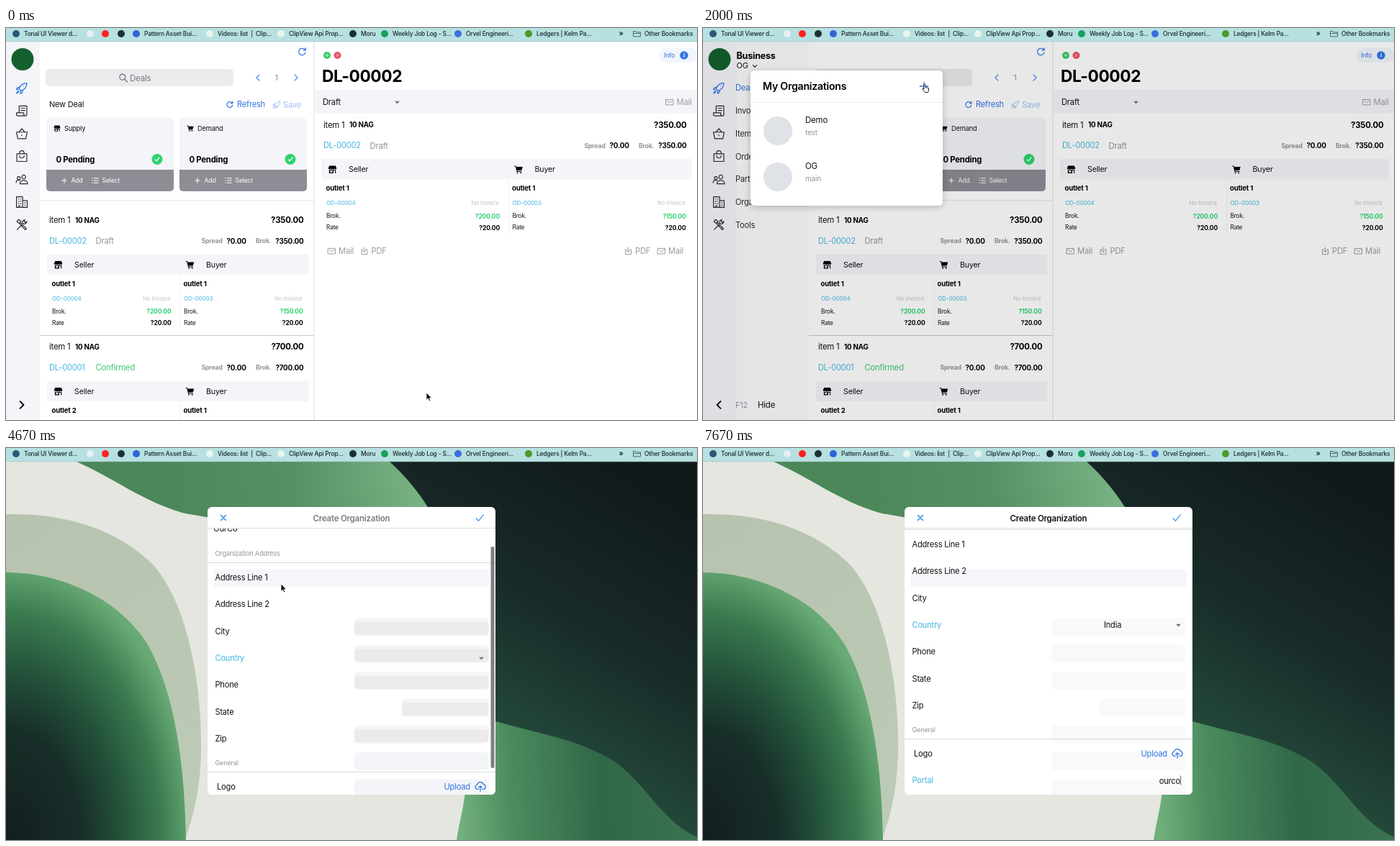
These frames come from a looping animation (960x545 px, 8000 ms). An HTML page:

```html
<!DOCTYPE html>
<html lang="en">
<head>
<meta charset="utf-8">
<title>Create organization</title>
<style>
  html, body { margin: 0; width: 100%; height: 100%; overflow: hidden; background: #fff; }
  svg { display: block; width: 960px; height: 545px; }
  text { font-family: Inter, "Open Sans", sans-serif; letter-spacing: -.02em; white-space: pre; }
</style>
</head>
<body>
<script>
const LOOP = 8000;
const BLUE = '#2f72e4', SKY = '#45b5e0', GREEN = '#2dd36f', GRAY = '#92949c', PALE = '#f4f5f8';
const rules = [];

// Stepped animation of one property: stops are [ms, value]
function anim(prop, stops) {
  const name = 'a' + rules.length;
  const steps = stops.map(([t, v]) => `${t / LOOP * 100}%{${prop}:${v}}`).join('');
  rules.push(`@keyframes ${name}{${steps}}`);
  return `style="animation:${name} ${LOOP}ms step-end infinite"`;
}
const group = (attrs, ...parts) => `<g ${attrs}>${parts.join('')}</g>`;
const show = (from, to, ...parts) => {
  const stops = from ? [[0, 0], [from, 1]] : [[0, 1]];
  if (to < LOOP) stops.push([to, 0]);
  return group(anim('opacity', stops), ...parts);
};
const move = (stops, ...parts) =>
  group(anim('transform', stops.map(([t, x, y]) => [t, `translate(${x}px,${y}px)`])), ...parts);

// y is the middle of the capitals
const text = (x, y, str, size, fill = '#111', weight = 400, anchor = 'start') =>
  `<text x="${x}" y="${y + size * .36}" font-size="${size}" fill="${fill}" font-weight="${weight}" text-anchor="${anchor}">${str}</text>`;
const bold = (x, y, str, size, fill = '#000') => text(x, y, str, size, fill, 700);
const right = (x, y, str, size, fill = '#000', weight = 700) => text(x, y, str, size, fill, weight, 'end');
const rect = (x, y, w, h, fill, r = 0) => `<rect x="${x}" y="${y}" width="${w}" height="${h}" rx="${r}" fill="${fill}"/>`;
const dot = (x, y, r, fill) => `<circle cx="${x}" cy="${y}" r="${r}" fill="${fill}"/>`;
const line = (d, color, w = 1) =>
  `<path d="${d}" fill="none" stroke="${color}" stroke-width="${w}" stroke-linecap="round" stroke-linejoin="round"/>`;

// Outline icons in a 16 x 16 box
const ICONS = {
  rocket: 'M4.5 9C6 4 10 1.5 14.5 1.5 14.5 6 12 10 7 11.5zM5.5 6.5L2 7.5.8 10l3.7-1M9.5 10.5L8.5 14 6 15.2l1-3.7M3.5 11.5L1 15l3.5-2.5M10.5 5.5v.1',
  receipt: 'M4.5 10.5v-9h10v11a2 2 0 0 1-4 0v-2H1v2a2 2 0 0 0 2 2h9.5M7 4.5h5M7 7.5h5',
  basket: 'M1 6h14l-1.7 8.5H2.7zM4 6l4-4.5L12 6M8 9.5v1',
  bag: 'M1.5 4.5h13v10h-13zM5 4.5v-1a3 3 0 0 1 6 0v1M5 7a3 3 0 0 0 6 0',
  people: 'M10.5 2.5a2.5 2.5 0 1 0 .01 0M5.5 14c0-6 10-6 10 0zM4 4.5a2 2 0 1 0 .01 0M.5 12.5c0-3 2.5-4 5-3',
  building: 'M1 15V1h8v14zM9 6h6v9H9M3.5 4h.5M6 4h.5M3.5 7H4M6 7h.5M3.5 10H4M6 10h.5M11.5 9h1M11.5 12h1M4 15v-2h2',
  tools: 'M2 14L9.5 6.5M14.5 3.5a3.5 3.5 0 0 1-5 3M12 1.2a3.5 3.5 0 0 0-3 4.5M14.5 3.5L12.5 5l-1.5-1.5 1-2.3M1.5 3.5L4 1l3 2.5L4.5 6zM6 5l8 8-1.5 1.5-7.5-8',
  refresh: 'M13.5 9A5.8 5.8 0 1 1 11.5 3.5L13.5 5M13.7 1.5V5.3H10',
  search: 'M6.5 1.5a5 5 0 1 0 .01 0M10.2 10.2l4.6 4.6',
  mail: 'M1 3h14v10.5H1zM3 5.5l5 4 5-4',
  pdf: 'M5 5H2.5v9.5h11V5H11M8 1v9M5.2 7.5L8 10.2l2.8-2.7',
  list: 'M5.5 3h9M5.5 8h9M5.5 13h9M1.5 3h.8M1.5 8h.8M1.5 13h.8',
  plus: 'M8 1.5v13M1.5 8h13',
  cloud: 'M5.5 12H4a3.3 3.3 0 0 1-.3-6.5 4.6 4.6 0 0 1 8.8-.3A3.5 3.5 0 0 1 12.3 12h-1.8M8 15V7.5M5.7 9.5L8 7.2l2.3 2.3',
  right: 'M5 2l6 6-6 6', left: 'M11 2L5 8l6 6', down: 'M2 5l6 6 6-6',
  cross: 'M2 2l12 12M14 2L2 14', tick: 'M1.5 9l4.5 4.5 9-11'
};
const icon = (name, x, y, size, color, w = 1.2) =>
  group(`transform="translate(${x - size / 2} ${y - size / 2}) scale(${size / 16})"`,
    line(ICONS[name], color, w * 16 / size));
const solid = (d, x, y, size) =>
  `<path transform="translate(${x - size / 2} ${y - size / 2}) scale(${size / 16})" fill-rule="evenodd" d="${d}"/>`;
const store = (x, y, s) => solid('M2 1h12l2 5a2.2 2.2 0 0 1-4 1 2.3 2.3 0 0 1-4 0 2.3 2.3 0 0 1-4 0A2.2 2.2 0 0 1 0 6zM1.5 9h13v6.5h-13zM3.5 10.5V14H8v-3.5zM10 10.5v5h3v-5z', x, y, s);
const cart = (x, y, s) => solid('M0 1h3l.7 2H16l-2 7H5.6l.4 1.5h8V13H4.7L2 2.5H0zM6 13.5a1.2 1.2 0 1 0 .01 0M12.5 13.5a1.2 1.2 0 1 0 .01 0', x, y, s);
const caret = (x, y) => `<path d="M${x - 3.5} ${y - 1.7}h7l-3.5 3.7z" fill="#777"/>`;

function bookmarks() {
  const tabs = [
    [14, '#2b5876', 'Tonal UI Viewer d...'], [117, '#e9eef5'], [138, '#f22'], [160, '#1c3034'],
    [181, '#2f63d8', 'Pattern Asset Bui...'], [283, '#e8f4ee', 'Videos: list  |  Clip...'],
    [382, '#e8f4ee', 'ClipView Api Prop...'], [482, '#1c3034', 'Moru'],
    [526, '#18a05a', 'Weekly Job Log - S...'], [628, '#3a6fe0', 'Orvel Engineeri...'],
    [726, '#4a9a28', 'Ledgers | Kelm Pa...']
  ];
  return rect(0, 0, 960, 19, '#b7e0e0') + rect(0, 18.5, 960, .7, '#a3c9c9') +
    tabs.map(([x, c, s]) => dot(x, 8, 5, c) + (s ? text(x + 11, 8, s, 8.4, '#17292b', 500) : '')).join('') +
    text(851.5, 7.5, '»', 10, '#17292b', 600) +
    line('M871.5 11.5v-7h3.5l1 1.3h5.5v5.7zM871.5 7.5h10', '#4c6b6e') +
    text(887, 8, 'Other Bookmarks', 8.4, '#17292b', 500);
}

function deal(x, end, y, id, status, total, names) {
  const half = (end - x + 27.5 - 15) / 2;
  const side = (x0, label, mark, name, order, brok) => {
    const edge = x0 + half - 17;
    return mark(x0 + 9, y + 62, 11.5) + text(x0 + 31.5, y + 62, label, 10.7) +
      bold(x0, y + 88.5, name, 9.6) +
      text(x0 + .5, y + 109, order, 8.2, SKY) + right(edge - 1, y + 109, 'No Invoice', 8, '#c3c4c9', 400) +
      text(x0 + .5, y + 127, 'Brok.', 8.3) + right(edge, y + 127, brok, 8.5, GREEN) +
      text(x0 + .5, y + 143, 'Rate', 8.3) + right(edge, y + 143, '?20.00', 8.5);
  };
  return text(x, y, 'item 1', 11.4) + bold(x + 36, y, '10 NAG', 9.8) + right(end, y, total, 11.4) +
    text(x, y + 29, id, 11.1, SKY) +
    text(x + 64.5, y + 29, status, 11.3, status === 'Draft' ? GRAY : '#3ec772') +
    bold(end - 142, y + 29, 'Spread', 8.7, GRAY) + bold(end - 107, y + 29, '?0.00', 9.9) +
    bold(end - 66.5, y + 29, 'Brok.', 8.7, GRAY) + right(end, y + 29, total, 9.9) +
    rect(x - 3, y + 47.5, end - x + 10, 28.5, PALE) +
    rect(x + half - 1.5, y + 77, 1, 75, '#f1f1f3') +
    side(x + 3.5, 'Seller', store, names[0], 'OD-00004', '?200.00') +
    side(x + 3.5 + half, 'Buyer', cart, names[1], 'OD-00003', '?150.00');
}

function dealCard(x, w, mark, label) {
  return rect(x, 125, w, 102, PALE, 5) +
    `<path d="M${x} 197h${w}v25a5 5 0 0 1-5 5h${10 - w}a5 5 0 0 1-5-5z" fill="#8d8e95"/>` +
    mark(x + 15, 139.5, 9) + text(x + 25, 139.5, label, 9.3) +
    bold(x + 13.5, 182.5, '0 Pending', 11.3) +
    dot(x + w - 23, 182.5, 7.5, GREEN) + icon('tick', x + w - 23, 182.5, 7, '#fff', 1.3) +
    icon('plus', x + 25, 212, 8, '#fff', 1) + text(x + 34.5, 212, 'Add', 8.7, '#fff') +
    icon('list', x + 68, 212, 10.5, '#fff', 1) + text(x + 77.5, 212, 'Select', 8.7, '#fff');
}

function sidebar(open) {
  const items = [['rocket', 'Deals'], ['receipt', 'Invoices'], ['basket', 'Items'], ['bag', 'Orders'],
    ['people', 'Parties'], ['building', 'Organizations'], ['tools', 'Tools']];
  const menu = items.map(([name, label], i) => {
    const y = 83.5 + i * 31.7, color = i ? '#2a2b2e' : BLUE;
    return icon(name, 22, y, 17, color) + (open ? text(45, y, label, 11.1, color) : '');
  }).join('');
  return (open ? rect(47, 19, 100, 526, '#fbfbfd') : '') + rect(0, 19, 47, 526, PALE) +
    dot(23, 43.5, 15.5, '#14602f') + menu +
    icon(open ? 'left' : 'right', 22, 524, 13, '#111', 2) +
    (open ? bold(46.5, 38, 'Business', 12.6) + text(46.5, 52, 'OG', 11) + icon('down', 72, 53, 7, '#222') +
      text(127.5, 83.5, 'F7', 10.7, GRAY) + text(45, 524, 'F12', 11, GRAY) + text(76, 524, 'Hide', 11.5) : '');
}

function app(open) {
  const sb = open ? 147 : 47, mid = open ? 486 : 428;
  const w = (mid - sb - 27) / 2, x = sb + 9, c = (sb + 8 + mid - 112) / 2;
  const end = mid - 14.5, px = mid + 13;
  const tool = (name, label, tx, y) => icon(name, tx - 9.5, y, 11.5, '#9a9ca3', 1) + text(tx, y, label, 11.2, '#9a9ca3');
  return rect(0, 19, 960, 526, '#fff') + sidebar(open) +
    icon('refresh', mid - 16.5, 33, 13, BLUE) +
    rect(sb + 8, 57, mid - 112 - sb - 8, 24, '#ebebed', 5) +
    icon('search', c - 22.5, 69.5, 13, '#6d6e74') + text(c - 13.5, 69.5, 'Deals', 11.5, '#77787e') +
    icon('left', mid - 78, 69, 11, '#3f86ee') + text(mid - 54.5, 69.5, '1', 11, GRAY) +
    icon('right', mid - 25, 69, 11, '#3f86ee') +
    text(sb + 13, 106, 'New Deal', 11) +
    icon('refresh', mid - 117, 106.5, 11, BLUE) + text(mid - 107, 106.5, 'Refresh', 11.1, BLUE) +
    icon('rocket', mid - 52, 106.5, 11.5, '#9dc1f8', 1) + text(mid - 43, 106.5, 'Save', 11.2, '#9dc1f8') +
    dealCard(x, w, store, 'Supply') + dealCard(x + w + 8, w, cart, 'Demand') +
    rect(sb, 239, mid - sb, 1.5, '#ececee') +
    deal(sb + 13, end, 267, 'DL-00002', 'Draft', '?350.00', ['outlet 1', 'outlet 1']) +
    rect(sb, 427, mid - sb, 1, '#c9cacd') +
    deal(sb + 13, end, 443, 'DL-00001', 'Confirmed', '?700.00', ['outlet 2', 'outlet 1']) +
    // detail pane
    rect(mid, 19, 960 - mid, 526, '#fff') + rect(mid - .5, 19, 1, 526, '#dcdde0') +
    dot(mid + 18, 38, 5, '#3fca69') + icon('plus', mid + 18, 38, 5, '#d7f6e0', .8) +
    dot(mid + 32.5, 38, 5, '#e8526a') + icon('cross', mid + 32.5, 38, 4, '#fbd6dc', .8) +
    bold(mid + 11, 66.5, 'DL-00002', 22.8) +
    rect(907, 28, 53, 20, '#f1f5fd', 10) + text(914, 38, 'Info', 8.9, BLUE) +
    dot(942, 38, 5.7, BLUE) + text(942, 38, 'i', 8, '#fff', 700, 'middle') +
    rect(mid + .5, 86, 960 - mid, 33, PALE) + text(mid + 12, 103, 'Draft', 11.2) + caret(mid + 115.5, 103.5) +
    tool('mail', 'Mail', 931.5, 103) +
    deal(px, 945.5, 134.5, 'DL-00002', 'Draft', '?350.00', ['outlet 1', 'outlet 1']) +
    tool('mail', 'Mail', px + 21, 310) + tool('pdf', 'PDF', px + 66.5, 310) +
    tool('pdf', 'PDF', 874, 310) + tool('mail', 'Mail', 920, 310);
}

function popover() {
  const row = (y, name, note) => dot(104, y, 20, '#dfe2e6') + text(142, y - 15, name, 11.5) + text(142, y + 2, note, 10, GRAY);
  const panel = h => rect(66, 59, 267, h, '#fff', 6);
  return show(1330, 2330, rect(0, 19, 960, 526, 'rgba(0,0,0,.09)')) +
    group('filter="url(#soft)"', show(1330, 1670, panel(44)), show(1670, 2330, panel(188))) +
    show(1330, 2330, text(83, 81, 'My Organizations', 14.2, '#000', 600), icon('plus', 307, 81, 14, BLUE, 1.3)) +
    show(1670, 2330, rect(66, 103, 267, 1, '#ececee'), row(143, 'Demo', 'test'), row(207, 'OG', 'main'));
}

const grad = (type, id, pos, stops) => `<${type}Gradient id="${id}" gradientUnits="userSpaceOnUse" ${pos}>` +
  stops.map(([o, c]) => `<stop offset="${o}" stop-color="${c}"/>`).join('') + `</${type}Gradient>`;

const defs = `<defs>
  ${grad('linear', 'night', 'x1="900" y1="60" x2="660" y2="470"', [[0, '#11191b'], [.45, '#182b29'], [1, '#295642']])}
  ${grad('linear', 'ribbon', 'x1="220" y1="90" x2="580" y2="50"', [[0, '#4b8759'], [.5, '#568f63'], [1, '#7ab384']])}
  ${grad('linear', 'sage', 'x1="0" y1="100" x2="270" y2="500"', [[0, '#b7c3ae'], [1, '#bccbb6']])}
  ${grad('radial', 'hill', 'cx="0" cy="0" r="1" gradientTransform="translate(0 545) scale(262 385)"',
    [[0, '#121e1e'], [.4, '#182e29'], [.62, '#24533b'], [.82, '#3a7a4f'], [1, '#68aa75']])}
  ${grad('linear', 'mound', 'x1="630" y1="500" x2="960" y2="480"', [[0, '#72b07d'], [.22, '#4b8c5e'], [.6, '#306748'], [1, '#3b7450']])}
  <filter id="soft" x="-10%" y="-10%" width="120%" height="130%"><feDropShadow dx="0" dy="2" stdDeviation="5" flood-opacity=".22"/></filter>
  <clipPath id="sheet"><rect x="280" y="82" width="400" height="400" rx="6"/></clipPath>
  <clipPath id="below"><rect x="280" y="111" width="400" height="371"/></clipPath>
</defs>`;

function wallpaper() {
  const shape = (d, fill) => `<path d="${d}" fill="${fill}"/>`;
  return rect(0, 19, 960, 526, '#e4e6df') +
    shape('M500 19H960V545H672V200H560z', 'url(#night)') +
    shape('M98 19H533C556 40 576 64 592 92L570 150H420C360 102 300 102 245 90 190 74 150 42 98 19z', 'url(#ribbon)') +
    shape('M0 92C80 90 155 112 205 163 252 218 272 325 271 420Q270 490 248 545H0z', 'url(#sage)') +
    shape('M0 173C75 173 158 208 199 277 236 347 248 442 250 545H0z', 'url(#hill)') +
    shape('M626 545C632 505 645 480 640 380Q665 374 680 380C740 397 800 406 847 437 892 470 910 518 960 541V545z', 'url(#mound)');
}

function modal() {
  const rowY = i => 249 + i * 37.33;
  const labels = ['Address Line 1', 'Address Line 2', 'City', 'Country', 'Phone', 'State', 'Zip'];
  const field = (i, top, h) => {
    const x = i === 3 ? 550 : 484;
    return rect(x, rowY(i) + top, 670.5 - x, h, 'currentColor', 5);
  };
  const boxes = labels.map((_, i) => field(i, -12.5, 25)).join('');
  const shades = labels.slice(0, 5).map((_, i) => field(i, -7, 18)).join('');
  const late = (x, y, s) => show(0, 2670, text(x, y, s, 11.1, '#a3a5a9')) + show(2670, LOOP, text(x, y, s, 11.1, SKY));
  const content = [
    bold(296, 129.5, 'Create Organization', 22.6),
    text(288, 161, 'Name', 9.3),
    show(3670, 4000, text(288, 181, 'Our', 11.3)), show(4000, LOOP, text(288, 181, 'OurCo', 11.3)),
    show(3330, 3670, rect(288.5, 175, 1, 13, '#555')),
    text(290.5, 216, 'Organization Address', 9.2, '#8c9a8c'),
    rect(280, 228, 400, 1, '#d9dadc'),
    ...labels.map((s, i) => i === 3 ? late(290.5, rowY(i), s) : text(290.5, rowY(i), s, 11.1)),
    caret(660.5, rowY(3) + .5),
    show(5670, 6000, text(557, rowY(3), 'Ind', 11.1)), show(6000, LOOP, text(557, rowY(3), 'India', 11.1)),
    text(290.5, 507, 'General', 9.1, GRAY), rect(280, 519, 400, 1, '#d9dadc'),
    text(293, 540, 'Logo', 11.2), text(608.5, 540, 'Upload', 11.2, BLUE), icon('cloud', 659, 539.5, 16, BLUE),
    late(290.5, 577.5, 'Portal'),
    show(7330, 7670, right(663, 577.5, 'ou', 11.2, '#111', 400)),
    show(7670, LOOP, right(663, 577.5, 'ourco', 11.2, '#111', 400)),
    show(7000, LOOP, rect(663.3, 570.5, .8, 13, '#444'))
  ];
  const menu = (h, names) => group('filter="url(#soft)"', rect(553, 303, 117, h, '#fff', 3)) +
    rect(553, 303, 117, 22, PALE) + names.map((s, i) => text(557.5, 314 + i * 23, s, 10.5)).join('');
  const bar = color => icon('cross', 302, 97, 9, color, 1.5) + icon('tick', 658, 97, 12.5, color);
  const title = color => text(480, 97.5, 'Create Organization', 11.5, color, 600, 'middle');
  const thumb = y => rect(673.5, y, 5, 308, '#808182', 2.5);
  return move([[0, 0, 6], [2670, 0, 0]],
    group('clip-path="url(#sheet)"',
      rect(280, 82, 400, 400, '#fff'),
      rect(288, 169, 384, 24, '#f5f6fa', 3),
      group(anim('color', [[0, '#ebebec'], [2670, PALE], [5000, '#f9f9fb']]), boxes),
      show(2670, 5000, group('color="#ebebec"', shades)),
      show(0, 4670, content.join('')),
      show(4670, LOOP, group('clip-path="url(#below)"',
        move([[0, 0, 0], [4670, 0, -69], [5000, 0, -94], [6330, 0, -115]], ...content))),
      show(4670, LOOP, rect(280, 111, 400, 1, '#dededf')),
      show(4670, 5330, title('#7b7c80')), show(5330, LOOP, title('#111')),
      show(0, 2670, bar('#85888b')), show(2670, LOOP, bar('#3b95ec')),
      show(4670, 5000, thumb(137)), show(5000, 5330, thumb(152)), show(6330, 7000, thumb(170)),
      show(5330, 5670, menu(131, ['Afghanistan', 'Aland Islands', 'Albania', 'Algeria', 'American Samoa'])),
      show(5670, 6000, menu(46, ['British Indian Oc...', 'India']))));
}

function pointers() {
  const arrow = '<path d="M0 0v10.3l2.4-2.1 1.6 3.6 1.8-.8-1.6-3.5h3.3z" fill="#111" stroke="#fff" stroke-width=".8"/>';
  const hand = '<path d="M3 0a1 1 0 0 1 1 1v3.5l4.5 1v3.5L7.5 11.5h-4L0 6.8l1-.8 1 1V1a1 1 0 0 1 1-1z" fill="#fff" stroke="#111" stroke-width=".9"/>';
  const off = t => [t, -50, -50];
  return move([[0, 584, 507], [330, 170, 470], off(670), [2330, 404, 124], [3000, 458, 178], off(3330),
    [4330, 400, 200], [4670, 382, 189], [5000, 600, 266], off(5670), [6330, 586, 266], [6670, 549, 451], off(7000)], arrow) +
    move([off(0), [670, 21, 519], [1000, 61, 48], [1330, 65, 48], [2000, 305, 78], off(2330)], hand);
}

const stage = defs +
  show(0, 1000, app(false)) + show(1000, 2330, app(true)) + popover() +
  show(2330, LOOP, wallpaper(), modal()) + bookmarks() + pointers();
const style = document.createElement('style');
style.textContent = rules.join('\n');
document.head.append(style);
document.body.innerHTML = `<svg viewBox="0 0 960 545">${stage}</svg>`;
</script>
</body>
</html>
```
